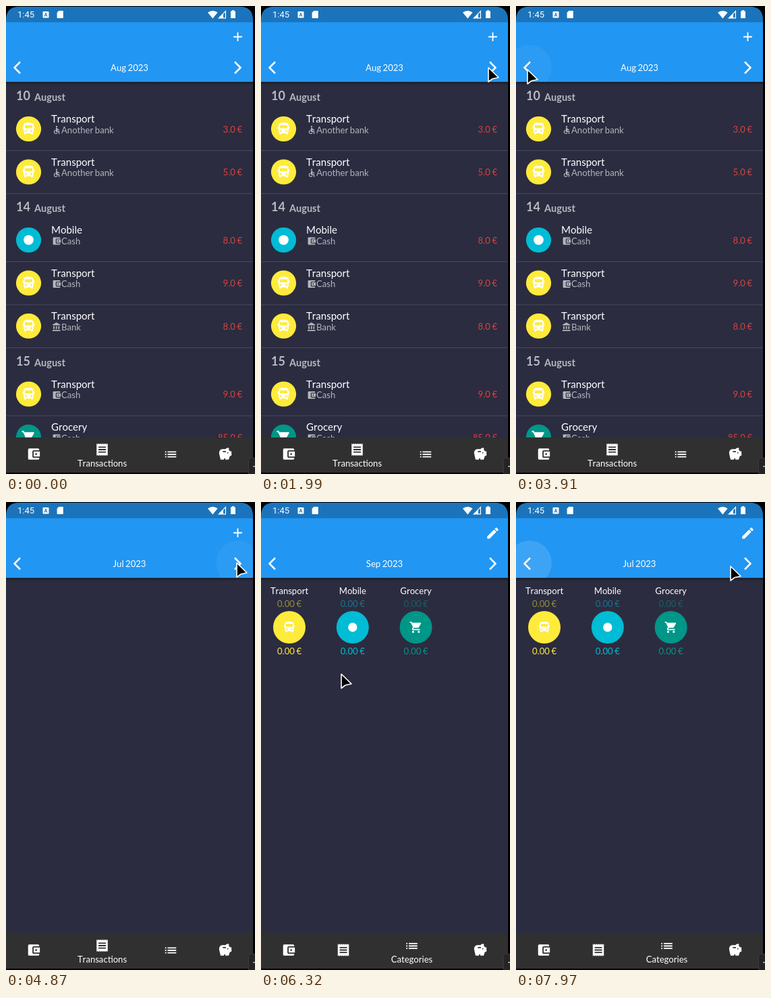
These frames come from a looping animation (369x691 px, 8 s). An HTML page:

```html
<!DOCTYPE html>
<html lang="en">
<head>
<meta charset="utf-8">
<title>Budget app</title>
<style>
  html, body { margin: 0; width: 100%; height: 100%; overflow: hidden; background: #000; }
  svg { display: block; width: 369px; height: 691px; font: 13.1px Lato, sans-serif; fill: #fff; font-kerning: none; word-spacing: -.06em; }
  .mid { text-anchor: middle; }
  .end { text-anchor: end; }
  .head { font-weight: 700; fill: #b9b9c1; }
  .sub { fill: #b4b4bc; }
  .cost { fill: #d9433f; }
  .line { fill: none; stroke: #fff; }
</style>
</head>
<body>
<svg id="stage" viewBox="0 0 369 691"></svg>
<script>
const LOOP = 8000;
const YELLOW = '#ffeb3b', CYAN = '#00bcd4', TEAL = '#009688';

const ICONS = {
  bus: 'M4 16c0 .88.39 1.67 1 2.22V20c0 .55.45 1 1 1h1c.55 0 1-.45 1-1v-1h8v1c0 .55.45 1 1 1h1c.55 0 1-.45 1-1v-1.78c.61-.55 1-1.34 1-2.22V6c0-3.5-3.58-4-8-4s-8 .5-8 4zm3.5 1a1.5 1.5 0 1 1 0-3 1.5 1.5 0 0 1 0 3zm9 0a1.5 1.5 0 1 1 0-3 1.5 1.5 0 0 1 0 3zM18 11H6V6h12zM2.5 8H4v4H2.5zM20 8h1.500v4H20z',
  dot: 'M12 4a8 8 0 1 0 0 16 8 8 0 0 0 0-16z',
  cart: 'M7 18a2 2 0 1 0 0 4 2 2 0 0 0 0-4zM1 2v2h2l3.6 7.59-1.35 2.45C4.5 15.4 5.5 17 7 17h12v-2H7.42a.25.25 0 0 1-.22-.37L8.1 13h7.45c.75 0 1.41-.41 1.75-1.03l3.58-6.49A1 1 0 0 0 20 4H5.21l-.94-2zm16 16a2 2 0 1 0 0 4 2 2 0 0 0 0-4z',
  wallet: 'M21 18v1a2 2 0 0 1-2 2H5a2 2 0 0 1-2-2V5a2 2 0 0 1 2-2h14a2 2 0 0 1 2 2v1h-9a2 2 0 0 0-2 2v8a2 2 0 0 0 2 2zm-9-2h10V8H12zm4-2.5a1.5 1.5 0 1 1 0-3 1.5 1.5 0 0 1 0 3z',
  bank: 'M4 10v7h3v-7zm6 0v7h3v-7zM2 22h19v-3H2zm14-12v7h3v-7zM11.5 1L2 6v2h19V6z',
  chair: 'M12 2a2 2 0 1 0 0 4 2 2 0 0 0 0-4zM19 13v-2c-1.54.02-3.09-.75-4.07-1.83l-1.29-1.43A2.1 2.1 0 0 0 11.8 7 2 2 0 0 0 10 9.09V15c0 1.1.9 2 2 2h5v5h2v-5.5a2 2 0 0 0-2-2h-3v-3.45c1.29 1.07 3.25 1.94 5 1.95zm-6.17 5A3 3 0 1 1 9 14.17V12.1A5 5 0 1 0 14.9 18z',
  receipt: 'M18 17H6v-2h12zm0-4H6v-2h12zm0-4H6V7h12zM3 22' + 'l1.5-1.5 1.5 1.5'.repeat(6) + 'V2' + 'l-1.5 1.5-1.5-1.5'.repeat(6) + 'z',
  list: [7, 11, 15].map(y => `M3 ${y}h2v2H3zM7 ${y}h14v2H7z`).join(''),
  piggy: 'M19.83 7.5l-2.27-2.27c.07-.42.18-.81.32-1.15C18.3 3 17.4 2 16.4 2c-1.59.03-3 .81-3.9 2h-5A5.5 5.5 0 0 0 2 9.5C2 12.5 4.5 21 4.5 21H10v-2h2v2h5.5l1.68-5.59L22 14.47V7.5zM13 9H8V7h5zm3 2a1 1 0 1 1 0-2 1 1 0 0 1 0 2z',
  pencil: 'M3 17.25V21h3.75L17.81 9.94l-3.75-3.75zM20.71 7.04a1 1 0 0 0 0-1.41l-2.34-2.34a1 1 0 0 0-1.41 0l-1.83 1.83 3.75 3.75z',
  plus: 'M19 13h-6v6h-2v-6H5v-2h6V5h2v6h6z'
};

const icon = (name, x, y, size = 22, fill = '#fff') =>
  `<path d="${ICONS[name]}" fill="${fill}" fill-rule="evenodd" transform="translate(${x - size / 2} ${y - size / 2}) scale(${size / 24})"/>`;
const text = (s, x, y, cls = '', extra = '') => `<text x="${x}" y="${y}" class="${cls}" ${extra}>${s}</text>`;
const rect = (x, y, w, h, fill, extra = '') => `<rect x="${x}" y="${y}" width="${w}" height="${h}" fill="${fill}" ${extra}/>`;
const disc = (x, y, r, fill) => `<circle cx="${x}" cy="${y}" r="${r}" fill="${fill}"/>`;
const group = (id, body, extra = '') => `<g id="${id}" ${extra}>${body}</g>`;

const KINDS = { Transport: ['bus', YELLOW], Mobile: ['dot', CYAN], Grocery: ['cart', TEAL] };
const ACCOUNTS = { 'Another bank': 'chair', Cash: 'wallet', Bank: 'bank' };
const DAYS = {
  10: ['Transport/Another bank/3.0', 'Transport/Another bank/5.0'],
  14: ['Mobile/Cash/8.0', 'Transport/Cash/9.0', 'Transport/Bank/8.0'],
  15: ['Transport/Cash/9.0', 'Grocery/Cash/85.0']
};
const SPENT = ['34.00 €', '8.00 €', '85.00 €'];

function row(entry, y) {
  const [kind, account, cost] = entry.split('/');
  const [glyph, color] = KINDS[kind];
  return disc(33.5, y, 18.6, color) + icon(glyph, 33.5, y) +
    text(kind, 67, y - 9.5, '', 'font-size="15"') +
    icon(ACCOUNTS[account], 75, y + 1.5, 14.5, '#b4b4bc') +
    text(account, 82, y + 6, 'sub') + text(cost + ' €', 350, y + 5, 'cost end') +
    rect(0, y + 31.5, 366, 1, '#47485b');
}

function transactions() {
  let y = 181.5, out = '';
  for (const day in DAYS) {
    out += text(day, 15, y - 42.5, 'head', 'font-size="18"') + text('August', 42, y - 41.5, 'head', 'font-size="14.5"');
    for (const entry of DAYS[day]) { out += row(entry, y); y += 63.5; }
    y += 37;
  }
  return out;
}

const categories = () => Object.entries(KINDS).map(([name, [glyph, color]], i) => {
  const x = 42 + i * 93.8;
  return text(name, x, 135.5, 'mid') +
    text('0.00 €', x, 155, 'mid', `fill="${color}" opacity=".5"`) +
    disc(x, 185, 24, color) + icon(glyph, x, 185, 20) +
    text('0.00 €', x, 225, 'mid spent', `fill="${color}"`);
}).join('');

const statusBar = rect(0, 0, 366, 24, '#1b74bb') +
  text('1:45', 17, 17, '', 'style="font:13px Roboto,sans-serif"') +
  rect(54.5, 8, 9, 9.5, '#fff', 'rx="1"') +
  '<path d="M57 15.6l2-5.4 2 5.4M57.7 14h2.6" fill="none" stroke="#1b74bb"/>' +
  '<path d="M78.3 7H84q.8 0 .8.8v9.4q0 .8-.8.8h-7.6q-.8 0-.8-.8V9.8z"/>' +
  '<path d="M299 9.5q7.3-5 14.6 0L306.3 18.5z"/>' +
  '<path d="M325.4 7.7v10.1h-10.1z" class="line" stroke-width="1.2"/><path d="M322 11v7h-7z"/>' +
  '<path d="M333 7.5h2V6.3h3v1.2h2V18h-7z"/>';

const appBar = rect(0, 24, 366, 88, '#2196f3') +
  group('ripples', disc(20, 90, 33, '#fff') + disc(344, 90, 33, '#fff'), 'clip-path="url(#bar)"') +
  '<path d="M21 82.5l-8.5 8.5 8.5 8.5M339 82.5l8.5 8.5-8.5 8.5" class="line" stroke-width="2.5"/>' +
  text('', 183, 95.5, 'mid', 'id="month"') +
  group('plus', icon('plus', 343.5, 45.5)) + group('edit', icon('pencil', 343.5, 46));

const nav = rect(0, 637, 366, 52, '#303030') + icon('wallet', 41, 661.5) + icon('piggy', 325, 661.5) +
  group('navList', icon('receipt', 142.5, 655) + text('Transactions', 142.5, 679.5, 'mid') + icon('list', 244, 662)) +
  group('navCats', icon('receipt', 122, 661.5) + icon('list', 223.5, 655.5) + text('Categories', 223.5, 679.5, 'mid'));

const $ = id => document.getElementById(id);
$('stage').innerHTML = `<defs>
  <clipPath id="screen"><path d="M0 689V21Q0 1 20 1H346Q366 1 366 21V689z"/></clipPath>
  <clipPath id="bar"><rect y="24" width="366" height="88"/></clipPath>
  <clipPath id="body"><rect y="112" width="366" height="525"/></clipPath>
  <linearGradient id="shade" x2="0" y2="1"><stop stop-opacity=".35"/><stop offset="1" stop-opacity="0"/></linearGradient>
</defs>` +
  group('phone', rect(0, 0, 366, 689, '#2b2c40') +
    group('list', transactions(), 'clip-path="url(#body)"') + group('cats', categories()) +
    rect(0, 112, 366, 5, 'url(#shade)') + statusBar + appBar + nav, 'clip-path="url(#screen)"') +
  rect(359.5, 667.5, 14, 28, '#242424', 'rx="3" stroke="#3a3a3a"') + rect(366, 679, 3, 1.5, '#bbb') +
  '<path id="cursor" d="M0 0V21L6 16.5 15 14.5z" fill="#000" stroke="#fff" stroke-width="1.6" stroke-linejoin="round"/>';

// month steps: time, direction
const TAPS = [[2560, 1], [3910, -1], [4240, -1], [5280, 1], [5360, 1], [6700, -1], [7590, -1]];
const MONTHS = ['Jul', 'Aug', 'Sep'];
const TAB_TIME = 6080;

// long presses leave a ripple on the left or right arrow
const PRESSES = { left: [3910, 7430], right: [4870] };

// pointer: start, end, x and y at the end
const ENTER = 1150;
const MOVES = [
  [ENTER, 2000, 337, 91], [2150, 2800, 345, 92], [3200, 3600, 17, 86], [3840, 3920, 17, 94],
  [4320, 4880, 342, 90], [5360, 5600, 270, 500], [5840, 6000, 232, 652],
  [6160, 6320, 119, 254], [6320, 6400, 2, 97], [6480, 6560, 10, 88], [7600, 7920, 318, 95]
];
// brief passes: start, end, from, to
const PASSES = [[290, 420, [58, 302], [37, 131]], [580, 730, [44, 14], [38, 2]]];

const clamp = k => Math.min(1, Math.max(0, k));
const ease = k => k * k * (3 - 2 * k);
const mix = (a, b, k) => a.map((v, i) => v + (b[i] - v) * k);
const ripple = d => d < 0 || d > 740 ? 0 : .18 * Math.sin(Math.PI * (d + 60) / 800);

function pointer(t, tick) {
  const pass = PASSES.find(([start, end]) => t >= start && t < end);
  if (pass) return mix(pass[2], pass[3], (t - pass[0]) / (pass[1] - pass[0]));
  if (t < ENTER) return null;
  return MOVES.reduce((at, [start, end, ...to]) => mix(at, to, ease(clamp((tick - start) / (end - start)))), [22, -12]);
}

const show = (id, on) => { $(id).style.display = on ? '' : 'none'; };
const rings = $('ripples').children;
const sums = document.querySelectorAll('.spent');

function draw(t) {
  const month = MONTHS[TAPS.reduce((m, [at, dir]) => t >= at ? m + dir : m, 1)];
  const onCats = t >= TAB_TIME, inAug = month === 'Aug';
  $('month').textContent = month + ' 2023';
  show('list', inAug && !onCats);
  for (const id of ['cats', 'edit', 'navCats']) show(id, onCats);
  for (const id of ['plus', 'navList']) show(id, !onCats);
  sums.forEach((el, i) => { el.textContent = inAug ? SPENT[i] : '0.00 €'; });

  Object.values(PRESSES).forEach((times, i) =>
    rings[i].setAttribute('opacity', Math.max(...times.map(at => ripple(t - at)))));

  // the pointer refreshes in 80 ms ticks
  const at = pointer(t, Math.floor((t + 10) / 80) * 80);
  show('cursor', at);
  if (at) $('cursor').setAttribute('transform', `translate(${at})`);
}

function loop() {
  draw(performance.now() % LOOP);
  requestAnimationFrame(loop);
}
loop();
</script>
</body>
</html>
```
